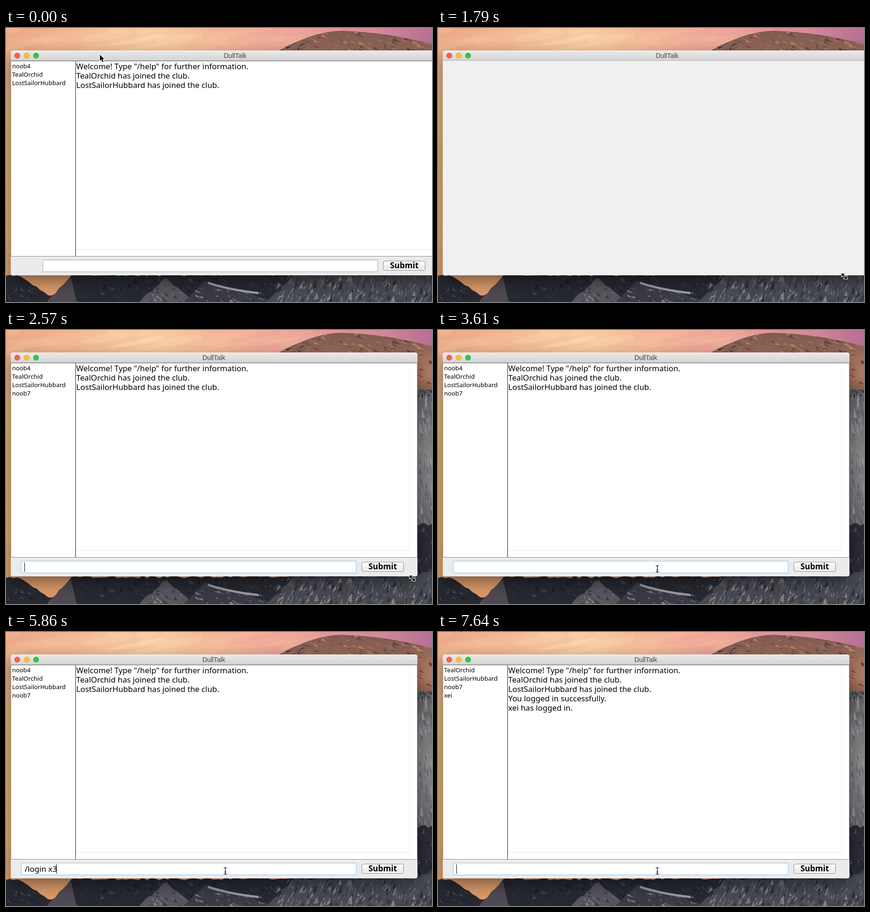
Write an HTML page with a canvas that moves like this. It is 907 px wide and 585 px high and loops after 8 s.

```html
<!DOCTYPE html>
<html lang="en">
<head>
<meta charset="utf-8">
<title>Chat window</title>
<style>
  html, body { margin: 0; width: 100%; height: 100%; overflow: hidden; background: #23242b; }
  canvas { display: block; }
</style>
</head>
<body>
<canvas id="stage" width="907" height="585"></canvas>
<script>
const W = 907, H = 585, LOOP = 8000;
const ctx = document.getElementById('stage').getContext('2d');
const SANS = '"Noto Sans", "Open Sans", sans-serif';
const CHAT = '16.75px ' + SANS, LIST = '13px ' + SANS, BOLD = 'bold 17px ' + SANS;
const TITLE = '13.8px "Liberation Sans", Arial, sans-serif';

const GUEST = 'noob4', NEW_GUEST = 'noob7', PINK = 'TealOrchid', PIRATE = 'LostSailorHubbard', NICK = 'xei';
const WELCOME = ['Welcome! Type "/help" for further information.',
  PINK + ' has joined the club.', PIRATE + ' has joined the club.'];
const GREETING = ['You logged in successfully.', NICK + ' has logged in.'];

const BLINK = 488, FIRST_BLINK = 155;
const JOIN = 1620, DRAG = 1730, DRAG_STEP = 165, LEAVE = 2720, LOGIN = 7640;

// Bursts of key presses: start, keys, gap between keys.
const BURSTS = [
  [4140, '/l', 300], [4620, 'ogin ', 72], [5270, 'x3i', 560],
  [6950, '\b\b', 90], [7280, 'ei', 120], [LOGIN, '\n', 0]
];
const KEYS = BURSTS.flatMap(([start, keys, gap]) => [...keys].map((key, i) => ({ time: start + i * gap, key })));

const clamp = v => Math.max(0, Math.min(1, v));
const mix = (a, b, p) => a + (b - a) * p;
const easeOut = p => p * (2 - p);

// Progress in whole steps; the first step is taken at once.
const stepped = (t, start, gap, count) => clamp((Math.floor((t - start) / gap) + 1) / count);

function inputAt(t) {
  let typed = '', last = FIRST_BLINK;
  for (const { time, key } of KEYS) {
    if (time > t) break;
    last = time;
    typed = key === '\n' ? '' : key === '\b' ? typed.slice(0, -1) : typed + key;
  }
  return { typed, caret: Math.floor((t - last) / BLINK) % 2 === 0 };
}

function rightEdge(step) {
  if (step < 0) return 967;
  return step < 2 ? mix(916, 864, easeOut(step / 2)) : mix(864, 876, clamp((step - 2) / 2));
}

// While dragged, the content is blank on every other step and the title lags.
function windowAt(t) {
  const step = Math.floor((t - DRAG) / DRAG_STEP);
  const blank = step === 0 || step === 2;
  const right = Math.round(rightEdge(step));
  const titleRight = blank ? rightEdge(step - 1) : right;
  return { right, blank, bottom: step < 5 ? 528 : 526, mid: (9 + titleRight) / 2 };
}

function rng(seed) {
  return () => (seed = (seed * 16807) % 2147483647) / 2147483647;
}
const rand = rng(77);

function poly(c, points, fill) {
  c.beginPath();
  for (const [x, y] of points) c.lineTo(x, y);
  c.closePath();
  c.fillStyle = fill;
  c.fill();
}

function ramp(c, x0, y0, x1, y1, colors) {
  const g = c.createLinearGradient(x0, y0, x1, y1);
  colors.forEach((color, i) => g.addColorStop(i / (colors.length - 1), color));
  return g;
}

// A jagged skyline through a few peaks, filled down to the stage bottom.
function ridge(c, peaks, rough, fill) {
  const line = [];
  peaks.forEach(([x, y], i) => {
    line.push([x, y]);
    if (i === peaks.length - 1) return;
    const [nx, ny] = peaks[i + 1], n = Math.ceil((nx - x) / 9);
    for (let k = 1; k < n; k++) line.push([mix(x, nx, k / n), mix(y, ny, k / n) + (rand() - 0.5) * rough]);
  });
  poly(c, [...line, [peaks.at(-1)[0], H], [peaks[0][0], H]], fill);
}

// Seeded slivers of rock along one slope.
function rock(c, count, x, y, w, h, colors, dx, dy) {
  for (let i = 0; i < count; i++) {
    const px = x + rand() * w, py = y + rand() * h, k = 0.3 + rand() * 0.8;
    const ex = px + dx * k + rand() * 6 - 3, ey = py + dy * k + rand() * 4 - 2;
    const color = colors[Math.floor(rand() * colors.length)];
    poly(c, [[px, py], [ex, ey], [px + rand() * 6 - 3, mix(py, ey, rand())]], color);
  }
}

function paintSky(c) {
  c.fillStyle = ramp(c, 0, 0, W, 0, ['#e9a985', '#f0b38f', '#f4c19b', '#f7c9a0', '#f2b297', '#eda798', '#e39996', '#d18a98', '#b66f92']);
  c.fillRect(0, 0, W, H);
  c.fillStyle = ramp(c, 0, 40, 0, H, ['rgba(233,181,125,0)', '#e2b87c', '#deb075', '#e5ad77', '#de9768']);
  c.fillRect(0, 40, 300, H);
  for (let i = 0; i < 45; i++) {
    const x = rand() * 640;
    c.fillStyle = x > 200 && x < 400 ? 'rgba(255,228,180,.2)' : 'rgba(247,196,160,.16)';
    c.beginPath();
    c.ellipse(x, rand() * 48, 20 + rand() * 45, 3 + rand() * 7, -0.15, 0, 7);
    c.fill();
  }
}

function paintDome(c) {
  c.save();
  c.beginPath();
  c.moveTo(560, 60);
  c.quadraticCurveTo(650, 6, 715, 6);
  c.quadraticCurveTo(800, 8, W, 34);
  c.lineTo(W, 135);
  c.lineTo(560, 135);
  c.clip();
  c.fillStyle = ramp(c, 0, 5, 0, 130, ['#7c5951', '#8d6456', '#ac765d', '#b37c64', '#8a5f51']);
  c.fillRect(560, 0, 347, 135);
  rock(c, 420, 570, 5, 337, 120, ['#6f4f48', '#a3705b', '#bd8568', '#87604f', '#614740'], 15, 8);
  rock(c, 40, 585, 30, 50, 20, ['#4d3f3e', '#5c4843'], 14, -6);
  c.restore();
}

function paintCliff(c) {
  c.fillStyle = ramp(c, 0, 125, 0, 420, ['#5b5b61', '#77777d', '#87858a', '#7c7b80', '#5f6066']);
  c.fillRect(600, 128, 307, 460);
  rock(c, 260, 850, 130, 57, 275, ['#68696f', '#96938f', '#5c5d64', '#84807f', '#a0968e'], 4, 26);
  rock(c, 50, 850, 124, 57, 14, ['#26282e', '#3b3d43'], 2, 9);
}

function paintValley(c) {
  const dark = ['#191b22', '#30323b', '#3f4049', '#262831'];
  const grey = ['#383a43', '#5b5c64', '#75757b', '#2b2d36', '#888387'];
  ridge(c, [[600, 440], [850, 418], [W, 414]], 8, '#2a2b33');
  rock(c, 110, 850, 420, 57, 130, [...dark, '#50515a'], -4, 14);
  ridge(c, [[0, 529], [32, 531], [90, 571], [104, 568], [140, 527], [700, 527]], 6, '#272932');
  rock(c, 60, 0, 548, 62, 37, dark, 8, 9);
  rock(c, 210, 132, 530, 440, 55, dark, 9, 10);
  ridge(c, [[88, 583], [138, 532], [150, 584]], 5, '#4f4a51');
  ridge(c, [[285, 584], [342, 534], [399, 584]], 9, '#55555d');
  rock(c, 60, 305, 550, 75, 35, grey, 9, 9);
  ridge(c, [[379, 584], [422, 540], [570, 584]], 7, '#3a3b45');
  rock(c, 80, 400, 555, 150, 30, grey, 10, 7);
  c.strokeStyle = '#9b9ca2';
  c.lineWidth = 5;
  c.beginPath();
  c.moveTo(430, 544);
  c.quadraticCurveTo(475, 559, 538, 566);
  c.stroke();
  ridge(c, [[555, 584], [612, 527], [850, 527], [W, 516]], 6, '#484a53');
  rock(c, 330, 575, 526, 332, 59, grey, -7, 18);
}

function makeDesktop() {
  const cv = document.createElement('canvas');
  cv.width = W;
  cv.height = H;
  const c = cv.getContext('2d');
  for (const paint of [paintSky, paintDome, paintCliff, paintValley]) paint(c);
  return cv;
}
const desktop = makeDesktop();

function rect(x, y, w, h, fill) {
  ctx.fillStyle = fill;
  ctx.fillRect(x, y, w, h);
}

function text(str, x, y, font, color = '#000', align = 'left') {
  ctx.font = font;
  ctx.fillStyle = color;
  ctx.textAlign = align;
  ctx.fillText(str, x, y);
}

function box(x, y, w, h, r) {
  ctx.beginPath();
  ctx.roundRect(x, y, w, h, r);
}

function outline(color, width) {
  ctx.strokeStyle = color;
  ctx.lineWidth = width;
  ctx.stroke();
}

function light(x, fill, edge) {
  ctx.beginPath();
  ctx.arc(x, 59, 5.7, 0, 7);
  ctx.fillStyle = fill;
  ctx.fill();
  outline(edge, 0.8);
}

function drawWindow(t) {
  const { right, bottom, blank, mid } = windowAt(t);
  const w = right - 10, h = bottom - 48;
  const corners = blank ? [5, 0, 0, 4] : [5, 5, 4, 4];

  ctx.save();
  ctx.shadowColor = 'rgba(0,0,0,.45)';
  ctx.shadowBlur = 34;
  ctx.shadowOffsetY = 13;
  box(10, 48, w, h, corners);
  ctx.fillStyle = blank ? '#f0f0f0' : '#ebebeb';
  ctx.fill();
  ctx.restore();

  ctx.save();
  box(10, 48, w, h, corners);
  ctx.clip();
  rect(10, 48, w, 22, ramp(ctx, 0, 48, 0, 70, ['#eaeaea', '#d3d3d3']));
  rect(10, 48, w, 1, '#f5f5f5');
  rect(10, 69, w, 1, '#b4b4b4');
  light(24, '#ff5c54', '#e0443e');
  light(44, '#fdbd2e', '#dfa023');
  light(64, '#30c940', '#20aa2f');
  text('DullTalk', mid, 64, TITLE, '#444', 'center');
  if (!blank) {
    drawPanes(t, right, bottom);
    drawInput(t, Math.round(32 + (right - 876) / 2), bottom);
  }
  ctx.restore();
}

function drawPanes(t, right, bottom) {
  const w = right - 10, base = bottom - 41;
  rect(10, 70, w, base - 70, '#fff');
  rect(10, 70, w, 1, '#777');
  for (const x of [10, 147, right - 1]) rect(x, 70, 1, base - 70, '#999');
  rect(148, 70, 1, base - 70, '#707070');
  rect(149, bottom - 56, right - 166, 1, '#e6e6e6');
  rect(right - 17, 71, 1, bottom - 126, '#ececec');
  rect(10, base, w, 1, '#808080');
  rect(10, base + 1, w, 1, '#f8f8f8');

  const loggedIn = t >= LOGIN;
  const users = [PINK, PIRATE];
  if (!loggedIn) users.unshift(GUEST);
  if (t >= JOIN) users.push(NEW_GUEST);
  if (loggedIn) users.push(NICK);
  const lines = loggedIn ? [...WELCOME, ...GREETING] : WELCOME;
  users.forEach((name, i) => text(name, 13, 86 + i * 18, LIST));
  lines.forEach((line, i) => text(line, 149.5, 88 + i * 20, CHAT));
}

function drawInput(t, left, bottom) {
  const { typed, caret } = inputAt(t);
  box(left + 0.5, bottom - 32.5, 713, 25, 0);
  ctx.fillStyle = '#fff';
  ctx.fill();
  outline(t < DRAG ? '#a8a8a8' : '#90c4ed', 1);
  text(typed, left + 8, bottom - 14, CHAT);
  if (caret) rect(left + 7 + Math.round(ctx.measureText(typed).width), bottom - 30, 1, 20, '#000');

  const x = left + 725, y = bottom - 31;
  box(x + 0.5, y + 0.5, 89, 20, 3.5);
  ctx.fillStyle = ramp(ctx, 0, y, 0, y + 21, ['#fff', '#f8f8f8', '#ececec', '#f4f4f4']);
  ctx.fill();
  outline('#8c8c8c', 1);
  text('Submit', x + 45, bottom - 15, BOLD, '#000', 'center');
}

function outlined(points) {
  ctx.lineJoin = 'round';
  poly(ctx, points, '#000');
  outline('#fff', 2);
  ctx.fill();
}

function arrow() {
  outlined([[0, 0], [0, 13], [3, 10.3], [5.3, 15.5], [7.4, 14.5], [5.2, 9.5], [9.2, 9.5]]);
}

function resize() {
  const half = [[-3, 1], [-3, 4.5], [-8.5, 0], [-3, -4.5], [-3, -1]];
  ctx.rotate(Math.PI / 4);
  outlined([...half, ...half.map(([x, y]) => [-x, -y])]);
}

function beam() {
  ctx.lineCap = 'round';
  ctx.beginPath();
  for (const sx of [-1, 1]) {
    ctx.moveTo(3 * sx, -7);
    ctx.quadraticCurveTo(0, -7, 0, -5);
    ctx.lineTo(0, 5);
    ctx.quadraticCurveTo(0, 7, 3 * sx, 7);
  }
  ctx.moveTo(-1.5, 2.5);
  ctx.lineTo(1.5, 2.5);
  outline('#fff', 2.6);
  outline('#000', 1.2);
}

function pointerAt(t) {
  if (t < DRAG) {
    const sweep = stepped(t, 320, 57, 4), exit = stepped(t, 670, 60, 3);
    return [arrow, mix(200, 816, sweep) + 124 * exit, mix(57, 518, sweep) + 62 * exit];
  }
  if (t < LEAVE) {
    const { right } = windowAt(t);
    return [resize, Math.min(right - 6, 865), 530];
  }
  const e = easeOut(stepped(t, 2870, 56, 11));
  const y = mix(543, 510, e) + 28 * e * (1 - e);
  return [y < 519 ? beam : arrow, mix(691, 467, e), y];
}

function drawPointer(t) {
  const [shape, x, y] = pointerAt(t);
  ctx.save();
  ctx.translate(Math.round(x), Math.round(y));
  shape();
  ctx.restore();
}

const start = performance.now();
function tick() {
  const t = (performance.now() - start) % LOOP;
  ctx.drawImage(desktop, 0, 0);
  drawWindow(t);
  drawPointer(t);
  requestAnimationFrame(tick);
}
tick();
</script>
</body>
</html>
```
